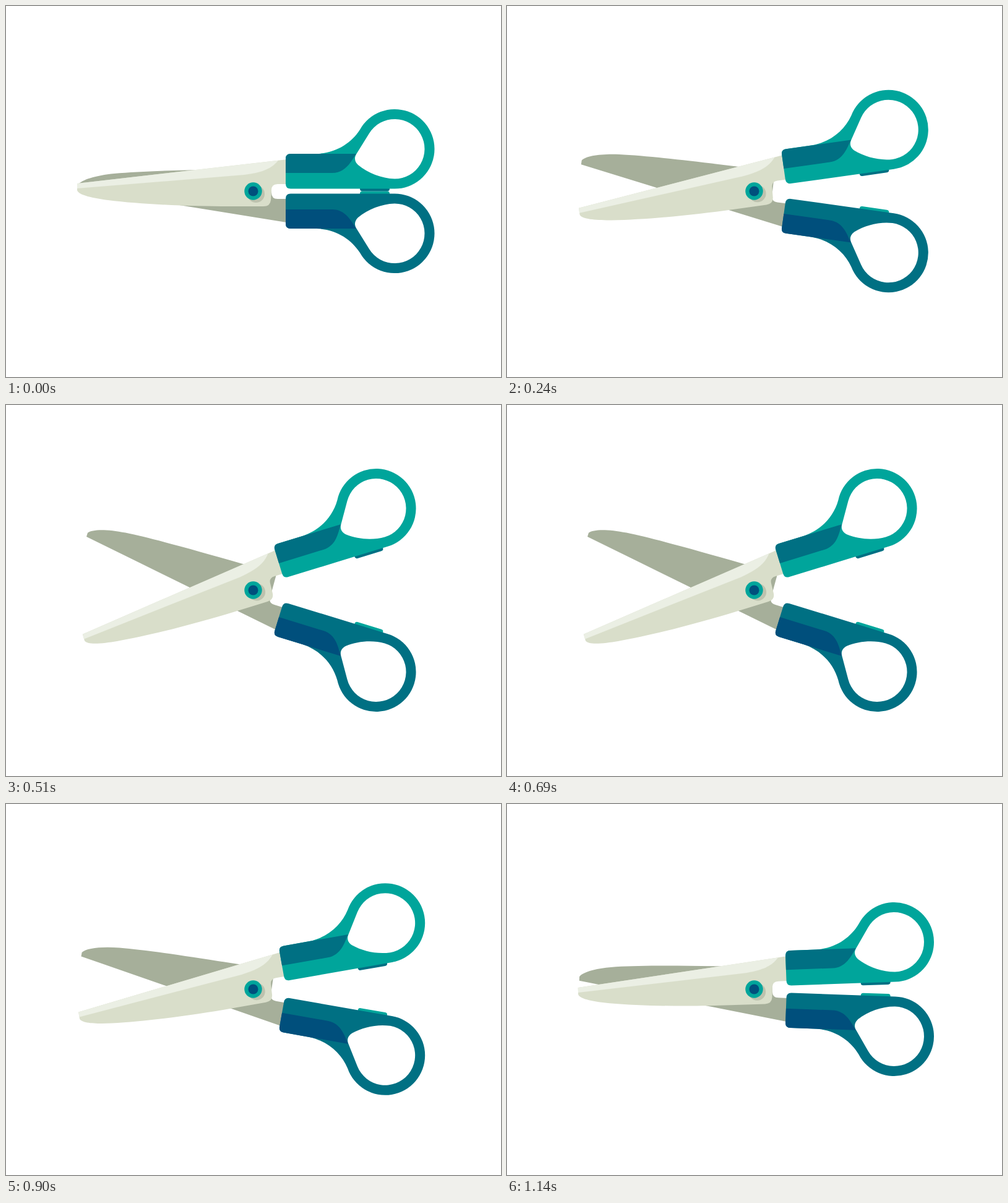
An HTML page that plays this animation: 800 px wide and 600 px high, repeating every 1.17 s.

```html
<!DOCTYPE html>
<html lang="en">
<head>
<meta charset="utf-8">
<title>Scissors</title>
<style>
  html, body { margin: 0; width: 100%; height: 100%; overflow: hidden; background: #fff; }
  svg { display: block; width: 100%; height: 100%; }
  .teal { --body: #00a59b; --shade: #007083; --pad: #007083; }
  .navy { --body: #007083; --shade: #004f7c; --pad: #00a59b; }
</style>
</head>
<body>
<svg viewBox="0 0 800 600">
  <defs>
    <g id="handle">
      <rect x="572" y="290" width="48" height="9.5" rx="4" fill="var(--pad)"/>
      <path fill="var(--body)" fill-rule="evenodd" d="M460 239H502C533 238 558 222 572 200A64.3 64.3 0 1 1 628 295.5H460Q452 295.5 452 287.500V247Q452 239 460 239Z
        M628 279.500A48.300 48.300 0 1 0 587 206L566.500 239C562 246 564 252 569 257C585 270 607 279 628 279.500Z"/>
      <path fill="var(--shade)" d="M460 239H566C558 251 549 270 527 270H452V247Q452 239 460 239Z"/>
    </g>
  </defs>

  <g id="lower" class="navy">
    <path fill="#a6af9a" d="M116.500 295.500V289C122 281 145 274 175 271C230 266 320 264.500 423 263Q428 263 428 268L429 302Q429 312 439 312H455V350.300Z"/>
    <use href="#handle" transform="matrix(1 0 0 -1 0 599)"/>
  </g>

  <g id="upper" class="teal">
    <path fill="#d9deca" d="M115 287L455 248V288H439Q429 288 429 298L428 314Q427 324 416 324H360C300 324 220 321 165 314C142 311 117 306 115 298Z"/>
    <path fill="#ebefe4" d="M115 287L440 249.700C430 262 417 269 385 273L115 295Z"/>
    <circle cx="404" cy="304" r="14" fill="#bdc2ae"/>
    <use href="#handle"/>
  </g>

  <circle cx="399.500" cy="299.500" r="14.200" fill="#00a59b"/>
  <circle cx="399.500" cy="299.500" r="8" fill="#004f7c"/>
</svg>
<script>
  const STEP = 30, STEPS = 39, PEAK = 20;
  const lower = document.getElementById('lower');
  const upper = document.getElementById('upper');
  const turn = (part, degrees) =>
    part.setAttribute('transform', `rotate(${degrees} 399.5 299.5)`);

  // One degree per step: open to the peak, then close again.
  function draw(now) {
    const step = Math.floor(now / STEP) % STEPS;
    const angle = PEAK - Math.abs(PEAK - step);
    turn(lower, angle);
    turn(upper, -angle);
  }

  const start = performance.now();
  function tick() {
    draw(performance.now() - start);
    requestAnimationFrame(tick);
  }
  tick();
</script>
</body>
</html>
```
